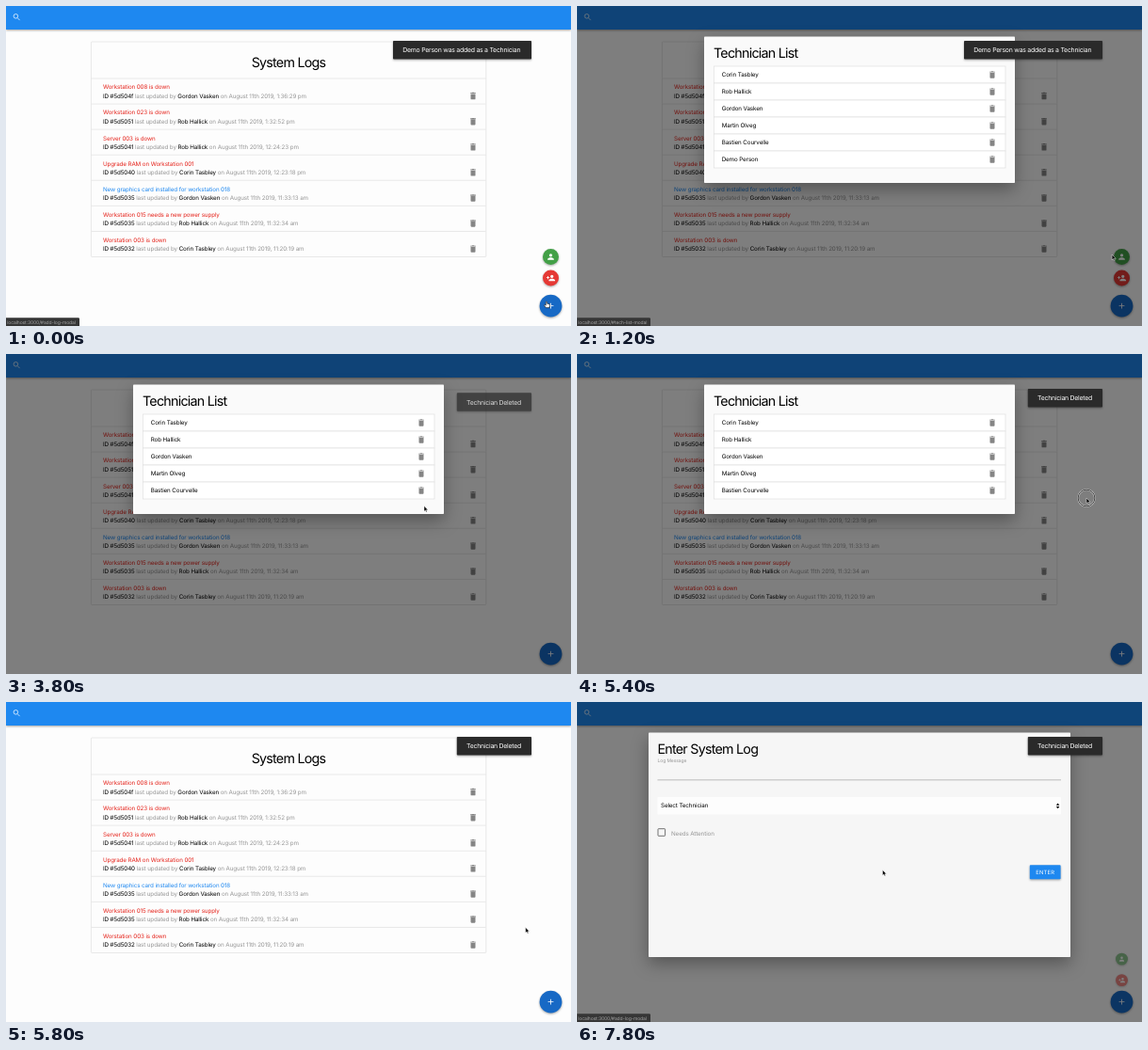
An HTML page that plays this animation: 600 px wide and 340 px high, repeating every 8000 ms.

```html
<!DOCTYPE html>
<html lang="en">
<head>
<meta charset="utf-8">
<title>System Logs</title>
<style>
  html, body { margin: 0; width: 100%; height: 100%; overflow: hidden; background: #fdfdfd; }
  svg { display: block; width: 600px; height: 340px; }
  text { font: 6.25px Inter, "Open Sans", sans-serif; letter-spacing: -.018em; white-space: pre; text-rendering: geometricPrecision; }
  .heading { font-size: 14.25px; letter-spacing: -.052em; }
  .toast { font-size: 6.9px; letter-spacing: -.035em; fill: #fff; }
  .status { font-size: 5px; letter-spacing: -.02em; fill: #a4a4a4; }
  .label { font-size: 5px; }
  .button { font-size: 5.83px; letter-spacing: .2px; fill: #fff; }
  .muted { fill: #979797; }
  .panel { fill: none; stroke: #e0e0e0; stroke-width: .7; }
  .modal { filter: drop-shadow(0 7px 9px rgba(0, 0, 0, .32)); }
  .raised { filter: drop-shadow(0 1px 1.2px rgba(0, 0, 0, .35)); }
</style>
</head>
<body>
<svg id="stage" viewBox="0 0 600 340"></svg>
<script>
const BLUE = '#1e88f0', RED = '#e5231b', LOOP = 8000;
const people = ['Corin Tasbley', 'Rob Hallick', 'Gordon Vasken', 'Martin Olveg', 'Bastien Courvelle', 'Demo Person'];
const [corin, rob, gordon] = people;
const logs = [
  ['Workstation 008 is down', '5d504f', gordon, '1:36:29 pm'],
  ['Workstation 023 is down', '5d5051', rob, '1:32:52 pm'],
  ['Server 003 is down', '5d5041', rob, '12:24:23 pm'],
  ['Upgrade RAM on Workstation 001', '5d5040', corin, '12:23:18 pm'],
  ['New graphics card installed for workstation 018', '5d5035', gordon, '11:33:13 am', BLUE],
  ['Workstation 015 needs a new power supply', '5d5035', rob, '11:32:34 am'],
  ['Worstation 003 is down', '5d5032', corin, '11:20:19 am']
];

// Markup helpers
const text = (x, y, content, attrs = '') => `<text x="${x}" y="${y}" ${attrs}>${content}</text>`;
const rect = (x, y, w, h, attrs = '') => `<rect x="${x}" y="${y}" width="${w}" height="${h}" ${attrs}/>`;
const line = (x1, x2, y) => `<path class="panel" d="M${x1} ${y}H${x2}"/>`;
const icon = (x, y, d, fill) =>
  `<path transform="translate(${x} ${y}) scale(.417) translate(-12 -12)" fill="${fill}" d="${d}"/>`;
const trash = (x, y) => icon(x, y, 'M6 19q0 2 2 2h8q2 0 2-2V7H6zM19 4h-3.5l-1-1h-5l-1 1H5v2h14z', '#858585');
const person = x => `M${x - 4} 8a4 4 0 0 1 8 0a4 4 0 0 1-8 0M${x - 8} 20v-2c0-2.7 5.3-4 8-4s8 1.3 8 4v2z`;
const fab = (id, y, r, color, d) =>
  `<g id="${id}"><g class="raised"><circle cx="578.5" cy="${y}" r="${r}" fill="${color}"/></g>${icon(578.5, y, d, '#fff')}</g>`;
const toast = (id, x, message) =>
  `<g id="${id}"><g class="raised">${rect(x, 37, 558 - x, 19.6, 'rx=".8" fill="#2a2a2a"')}</g>${text(x + 10.3, 49.3, message, 'class="toast"')}</g>`;

const logRow = ([title, id, name, time, color = RED], i) => {
  const y = 77 + i * 27.07;
  return line(90.5, 509.5, y) + text(103, y + 11.4, title, `fill="${color}"`) +
    text(103, y + 20.7, `ID #${id}<tspan class="muted"> last updated by </tspan>${name}` +
      `<tspan class="muted"> on August 11th 2019, ${time}</tspan>`) + trash(496, y + 18.6);
};

const techRow = (name, i) => `<g id="tech${i}">` +
  rect(145.4, 64 + 18 * i, 309.6, 18, 'class="panel" style="fill:#fff"') +
  text(153.7, 75.3 + 18 * i, name) + trash(441, 73 + 18 * i) + '</g>';

stage.innerHTML =
  rect(0, 0, 600, 340, 'fill="#fdfdfd"') +
  `<g class="raised">${rect(0, 0, 600, 25, `fill="${BLUE}"`)}</g>` +
  '<path d="M12.2 12.7L14.6 15.1M12.7 10.8a2.3 2.3 0 1 1-4.6 0a2.3 2.3 0 1 1 4.6 0" fill="none" stroke="#fff" stroke-width=".85" opacity=".85"/>' +
  rect(90.4, 38, 419.4, 228.5, 'rx=".8" class="panel"') +
  text(300, 65, 'System Logs', 'class="heading" text-anchor="middle"') +
  logs.map(logRow).join('') +
  fab('techFab', 266.5, 8.5, '#43a047', person(12)) +
  fab('addFab', 289, 8.5, '#e53935', person(15) + 'M6 10V7H4v3H1v2h3v3h2v-3h3v-2z') +
  fab('mainFab', 318.7, 11.9, '#1769c5', 'M19 13h-6v6h-2v-6H5v-2h6V5h2v6h6z') +
  rect(0, 0, 600, 340, 'id="overlay"') +
  `<g id="techModal"><g class="modal">${rect(135, 32.5, 330, 155.5, 'id="techBox" rx=".8" fill="#fafafa"')}</g>` +
  text(145, 55.2, 'Technician List', 'class="heading"') + people.map(techRow).join('') + '</g>' +
  `<g id="logModal"><g class="modal">${rect(76, 32.5, 448, 238.5, 'rx=".8" fill="#f6f6f6"')}</g>` +
  text(85.5, 55.2, 'Enter System Log', 'class="heading"') +
  text(85.5, 63.8, 'Log Message', 'class="label muted"') +
  rect(85.5, 82.6, 428.5, .6, 'fill="#929292"') +
  rect(85.5, 101, 428.5, 18.5, 'rx=".8" fill="#fdfdfd"') +
  text(89, 112.5, 'Select Technician') +
  '<path d="M508.8 109.7l1.8-2.3 1.8 2.3zM508.8 111l1.8 2.3 1.8-2.3z"/>' +
  rect(86, 134.7, 7.6, 7.6, 'rx=".6" fill="none" stroke="#5a5a5a" stroke-width=".85"') +
  text(100, 141.7, 'Needs Attention', 'class="muted"') +
  `<g class="raised">${rect(480.8, 173.2, 32.8, 15, `rx=".8" fill="${BLUE}"`)}</g>` +
  text(487.2, 182.8, 'ENTER', 'class="button"') + '</g>' +
  toast('addedToast', 411, people[5] + ' was added as a Technician') +
  toast('deletedToast', 478.8, 'Technician Deleted') +
  `<g id="status">${rect(-2, 331.3, 80, 12, 'id="statusBox" rx="1.2" fill="#363636"')}<text id="statusText" class="status" x="1.2" y="337.6"></text></g>` +
  '<g id="pointer"><g id="ring" fill="none"><circle stroke="#fff" stroke-opacity=".6" stroke-width="1.8"/><circle stroke="#222" stroke-width=".8"/></g>' +
  '<path id="arrow" d="M0 0v5.7l1.3-1.2.9 2 1-.4-.9-1.9h1.8z" stroke="#fff" stroke-width=".45"/>' +
  '<path id="hand" d="M-.7.3Q0-.7.7.3V2.2l2.4.6q.6.2.5 1L3 6.6H-.6L-2.5 3.9q.2-1 1.1-.4l.7.6z" fill="#fff" stroke="#111" stroke-width=".6"/></g>';

// Timing helpers
const clamp = v => Math.min(1, Math.max(0, v));
const progress = (t, start, duration) => clamp((t - start) / duration);
const outQuad = p => 1 - (1 - p) ** 2;
const outCubic = p => 1 - (1 - p) ** 3;
const smooth = p => p * p * (3 - 2 * p);
const el = id => document.getElementById(id);
const between = (t, a, b) => t >= a && t < b;
const show = (id, visible) => el(id).style.display = visible ? '' : 'none';

const cursorPath = [
  [0, 574, 314], [150, 574, 314], [700, 579, 269], [1050, 579, 269], [2200, 349, 165.5],
  [2600, 349, 165.5], [3250, 444, 161.5], [3900, 444, 161.5], [5100, 541, 153], [5450, 541, 153],
  [5800, 551.7, 239.5], [6100, 551.7, 239.5], [6900, 577, 318.7], [7430, 577, 318.7], [7800, 324.5, 178.5], [LOOP, 324.5, 178.5]
];
const clicks = [690, 3450, 5320, 7150];
const links = [
  [0, 500, '#add-log-modal', 78], [500, 1400, '#tech-list-modal', 78],
  [3200, 3780, '#!', 46], [6800, LOOP, '#add-log-modal', 78]
];

function placeModal(id, amount, height) {
  const cy = 32.5 + height / 2, scale = .8 + .2 * amount;
  show(id, amount > 0);
  el(id).style.opacity = amount;
  el(id).setAttribute('transform',
    `translate(300 ${cy - 19 * (1 - amount)}) scale(${scale}) translate(-300 ${-cy})`);
}

function placeFab(id, y, t, delay) {
  const amount = t < 4000
    ? 1 - outQuad(progress(t, 1250, 175))
    : outCubic(progress(t, 6780 + delay, 275)) * (1 - outQuad(progress(t, 7762, 175)));
  show(id, amount > 0);
  el(id).style.opacity = amount;
  el(id).setAttribute('transform',
    `translate(578.5 ${y + 16.7 * (1 - amount)}) scale(${.4 + .6 * amount}) translate(-578.5 ${-y})`);
}

function placePointer(t) {
  const i = cursorPath.findIndex(key => key[0] > t);
  const [t0, x0, y0] = cursorPath[i - 1], [t1, x1, y1] = cursorPath[i];
  const p = smooth((t - t0) / (t1 - t0));
  el('pointer').setAttribute('transform', `translate(${x0 + (x1 - x0) * p} ${y0 + (y1 - y0) * p})`);

  const hand = t < 350 || between(t, 3150, 3780) || between(t, 6780, 7500);
  show('hand', hand);
  show('arrow', !hand);

  const click = clicks.find(start => between(t, start, start + 350));
  show('ring', click !== undefined);
  for (const circle of el('ring').children) circle.setAttribute('r', 7 + 8 * (t - click || 0) / 350);
}

function draw(t) {
  const deleted = t >= 3750;
  const techHeight = deleted ? 137.5 : 155.5;
  const closing = progress(t, 5480, 250);
  const logOpening = progress(t, 7560, 250);
  placeModal('techModal', outCubic(progress(t, 896, 250)) * (1 - outQuad(closing)), techHeight);
  placeModal('logModal', outCubic(logOpening), 238.5);
  el('techBox').setAttribute('height', techHeight);
  show('tech5', !deleted);
  el('overlay').style.opacity = .5 *
    (outQuad(progress(t, 896, 250)) * (1 - closing) ** 4 + outQuad(logOpening));

  placeFab('techFab', 266.5, t, 40);
  placeFab('addFab', 289, t, 0);

  show('addedToast', t < 1800);
  const toastIn = outCubic(progress(t, 3700, 300));
  el('deletedToast').style.opacity = toastIn;
  el('deletedToast').setAttribute('transform', `translate(0 ${14.6 * (1 - toastIn)})`);

  const link = links.find(([start, end]) => between(t, start, end));
  show('status', link);
  if (link) {
    el('statusText').textContent = 'localhost:3000/' + link[2];
    el('statusBox').setAttribute('width', link[3] + 2);
  }
  placePointer(t);
}

const origin = performance.now();
function tick() {
  draw((performance.now() - origin) % LOOP);
  requestAnimationFrame(tick);
}
tick();
</script>
</body>
</html>
```
